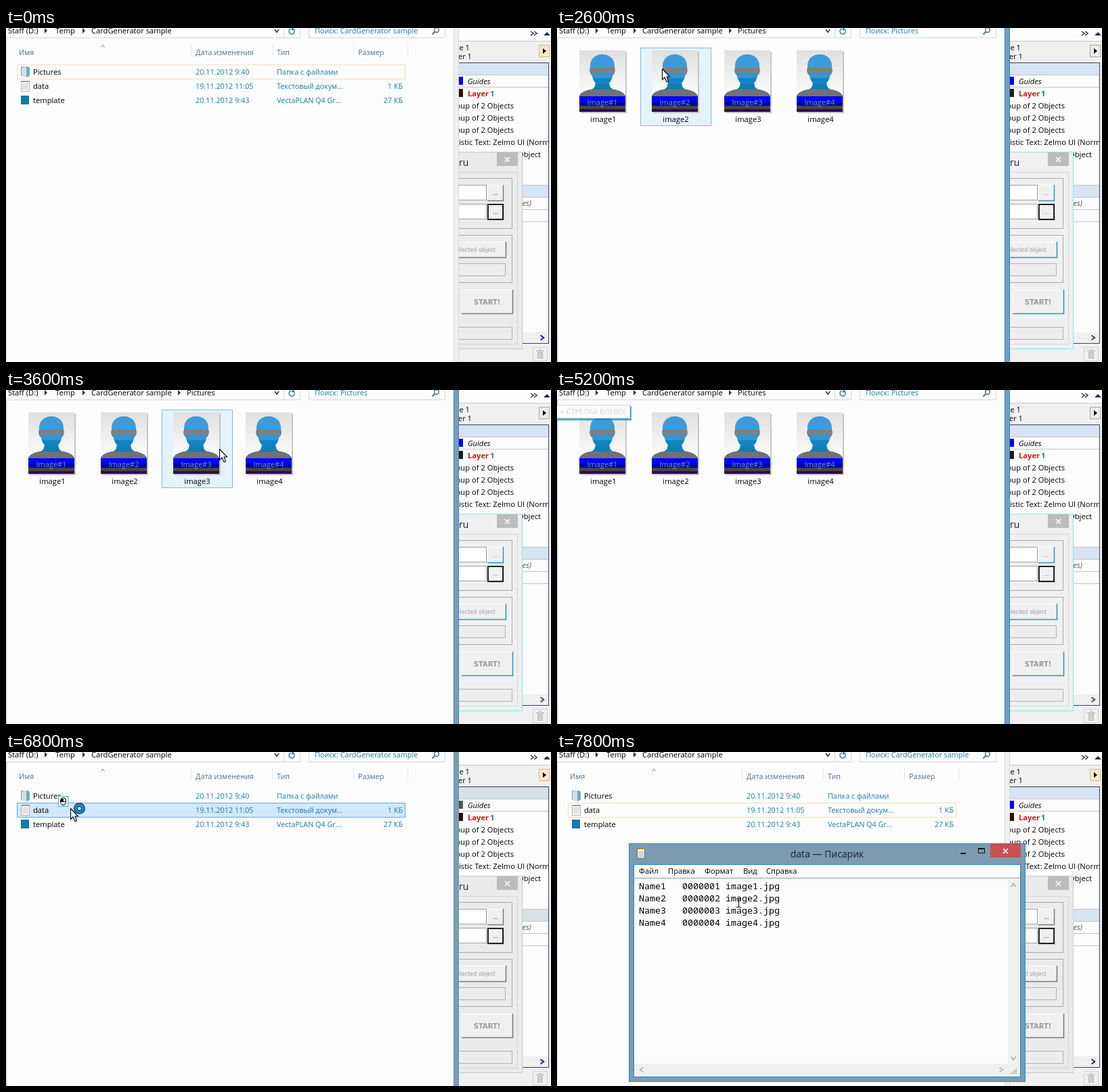
An HTML page with a canvas that plays this animation: 805 by 494 pixels, repeating every 8000 ms.

```html
<!DOCTYPE html>
<html lang="ru">
<head>
<meta charset="utf-8">
<style>
html, body { margin: 0; width: 100%; height: 100%; overflow: hidden; background: #fdfdfd; }
canvas { display: block; }
</style>
</head>
<body>
<canvas id="stage" width="805" height="494"></canvas>
<script>
const ctx = document.getElementById('stage').getContext('2d');
const LOOP = 8000, STEP = 200;
const UI = '11.2px "Open Sans", sans-serif';
const DETAIL = '10.8px "Open Sans", sans-serif';
const LINK = '#1f7aa4', BLUE = '#1f8bc6', GREY = '#c4c4c4';

// Pointer route: time, x, y
const route = [[0, 330, -40], [200, 300, -18], [800, 158, 58], [1000, 155, 60], [2800, 155, 60],
  [3400, 385, 92], [3600, 315, 87], [4000, -40, -40], [6000, -40, -40], [6600, 95, 83],
  [7200, 95, 83], [7800, 268, 223]];

const files = [
  ['Pictures', '20.11.2012 9:40', 'Папка с файлами', ''],
  ['data', '19.11.2012 11:05', 'Текстовый докум...', '1 КБ'],
  ['template', '20.11.2012 9:43', 'VectaPLAN Q4 Gr...', '27 КБ']
];

function box(x, y, w, h, fill, stroke) {
  if (fill) { ctx.fillStyle = fill; ctx.fillRect(x, y, w, h); }
  if (stroke) { ctx.strokeStyle = stroke; ctx.lineWidth = 1; ctx.strokeRect(x + .5, y + .5, w - 1, h - 1); }
}

function text(s, x, y, color = '#000', font = UI, align = 'left') {
  ctx.font = font; ctx.fillStyle = color; ctx.textAlign = align;
  ctx.fillText(s, x, y);
}

function line(color, width, ...p) {
  ctx.beginPath();
  for (let i = 0; i < p.length; i += 2) ctx.lineTo(p[i], p[i + 1]);
  ctx.strokeStyle = color; ctx.lineWidth = width; ctx.stroke();
}

function poly(fill, ...p) {
  ctx.beginPath();
  for (let i = 0; i < p.length; i += 2) ctx.lineTo(p[i], p[i + 1]);
  ctx.closePath(); ctx.fillStyle = fill; ctx.fill();
}

function ring(x, y, r, color, width, from = 0, to = 7) {
  ctx.beginPath(); ctx.arc(x, y, r, from, to);
  ctx.strokeStyle = color; ctx.lineWidth = width; ctx.stroke();
}

// Chevron pointing along (dx, dy)
function chevron(x, y, dx, dy, r = 3, color = '#555', width = 1.5) {
  line(color, width, x - (dx + dy) * r, y - (dy + dx) * r, x + dx * r * .4, y + dy * r * .4,
    x - (dx - dy) * r, y - (dy - dx) * r);
}

function cross(x, y, r) {
  line('#fff', 1.6, x - r, y - r, x + r, y + r);
  line('#fff', 1.6, x + r, y - r, x - r, y + r);
}

function bevel(x, y, w, h, edge) {
  box(x, y, w, h, '#f0f0f0', '#fff');
  line(edge, 1.5, x + w - .5, y, x + w - .5, y + h - .5, x, y + h - .5);
}

function pointerAt(t) {
  const i = Math.max(1, route.findIndex(p => p[0] >= t));
  const [a, b] = [route[i - 1], route[i]];
  const k = (t - a[0]) / (b[0] - a[0]);
  return [a[1] + (b[1] - a[1]) * k, a[2] + (b[2] - a[2]) * k];
}

function drawPanel(t, cool) {
  const strip = t >= 1000 && t < 1800 ? '#cfe6fb' : t >= 5800 && t < 7400 ? '#d9e1e7' : '#d7e4f2';
  box(661, 0, 144, 494, '#f0f0f0');
  box(661, 0, 144, 19, '#fdfdfd');
  line('#c8c8c8', 1, 661, 19.5, 805, 19.5);
  chevron(778, 8, 1, 0, 3, '#223', 1.3);
  chevron(783, 8, 1, 0, 3, '#223', 1.3);
  poly('#222a55', 794, 11, 804, 11, 799, 6);
  text('Page 1', 685, 33, '#000', UI, 'right');
  text('Layer 1', 688, 46, '#000', UI, 'right');
  box(787, 25, 16, 18, cool ? '#ececec' : '#fbe7cd', cool ? '#aaa' : '#d9b88a');
  poly('#000', 793, 30, 793, 38, 798, 34);

  box(661, 51, 141, 416, '#fdfdfd', '#3a3f66');
  box(661, 52, 140, 18, strip);
  box(661, 232, 140, 18, strip);
  for (const y of [69, 87, 232, 250, 268, 286]) line(GREY, 1, 661, y + .5, 801, y + .5);
  box(661, 72, 14, 12, t >= 6600 && t < 7400 ? '#555' : '#0000ff');
  box(661, 90, 14, 12, cool ? '#1c1c1c' : '#3a0505');
  text('Guides', 682, 83, '#000', 'italic ' + UI);
  text('Layer', 682, 101, '#d41616', 'bold ' + UI);
  text('1', 715, 101, '#1a7a9c', 'bold ' + UI);
  for (const y of [119, 137, 155]) text('Group of 2 Objects', 750, y, '#000', UI, 'right');
  ctx.save();
  ctx.beginPath(); ctx.rect(661, 52, 140, 414); ctx.clip();
  text('istic Text: Zelmo UI (Normal)', 669, 173);
  ctx.restore();
  text('of BARCODE XY Object', 790, 191, '#000', UI, 'right');
  text('Guides (all pages)', 776, 263, '#555', 'italic ' + UI, 'right');
  box(661, 450, 140, 16, '#f0f0f0');
  chevron(793, 458, 1, 0, 3.5, cool ? '#444' : '#171780', 1.7);

  box(778, 472, 22, 21, '#f0f0f0', '#d2d2d2');
  box(785, 479, 8, 10, '#dedede', '#b5b5b5');
  line('#b5b5b5', 1.3, 783, 477.5, 795, 477.5);
  line('#b5b5b5', 1, 787, 475.5, 791, 475.5);
  line('#b5b5b5', 1, 787.5, 480, 787.5, 487);
  line('#b5b5b5', 1, 790.5, 480, 790.5, 487);
}

function drawDialog(cool) {
  const edge = cool ? '#2d8fbe' : '#777';
  box(640, 183, 123, 292, cool ? '#f0f0f0' : '#ebebeb', cool ? '#8fe2f2' : '#cacaca');
  text('ru', 669, 204, '#33103f', '14px "Open Sans", sans-serif');
  box(725, 184, 31, 20, '#bcbcbc');
  cross(740.5, 194.5, 3.5);
  box(640, 213, 116, 255, cool ? '#f0f0f0' : '#ebebeb', '#d5d5d5');
  for (const [y, h] of [[222, 75], [306, 71]]) box(640, y, 108, h, null, '#a9a9a9');
  for (const y of [232, 260]) {
    box(640, y, 70, 23, '#fff', '#a0a0a0');
    bevel(711, y, 24, 24, edge);
    if (y > 240) box(711, y, 24, 24, null, '#111');
    text('...', 723, y + 15, cool ? '#b8740c' : '#222', '8px "DejaVu Sans", sans-serif', 'center');
  }
  box(712, 261, 22, 22, null, '#333');
  bevel(640, 316, 99, 24, edge);
  text('Selected object', 723, 331, '#999', '8.1px "DejaVu Sans", sans-serif', 'right');
  box(640, 348, 98, 19, '#ededed', '#b0b0b0');
  bevel(673, 387, 76, 36, edge);
  text('START!', 710.5, 409, '#999', 'bold 10px "DejaVu Sans", sans-serif', 'center');
  box(640, 442, 108, 19, '#ededed', '#b0b0b0');
}

function drawExplorer(inPictures, active) {
  const edge = inPictures ? BLUE : active ? '#5b98bb' : '#d8d8d8';
  box(0, 0, 669, 494, active ? '#7d9db4' : '#f0f0f0');
  box(0, 0, 661, 494, '#fdfdfd');
  line(edge, 1, 661.5, 0, 661.5, 494);
  line(edge, 1, 668.5, 0, 668.5, 494);
  line(active ? '#9cc4da' : '#d8d8d8', 1, .5, 15, .5, 494);
  line('#d6d6d6', 1, 0, 14.5, 434.5, 14.5, 434.5, 0);
  line('#d6d6d6', 1, 410.5, 0, 410.5, 14);
  line('#d6d6d6', 1, 447.5, 0, 447.5, 14.5, 648.5, 14.5, 648.5, 0);

  const crumbs = [['Staff (D:)', 3, 57], ['Temp', 73, 113], ['CardGenerator sample', 126, 254], ['Pictures', 267]];
  crumbs.slice(0, inPictures ? 4 : 3).forEach(([name, x, arrow], i) => {
    text(name, x, 8);
    if (i < 2 || inPictures && arrow) poly('#333', arrow, 0, arrow, 8, arrow + 4, 4);
  });
  chevron(400, 5, 0, 1, 3, '#444', 1.8);
  ring(422, 5, 4, '#44809f', 1.6, -.6, 4.4);
  poly('#44809f', 422, -1, 427, 2, 422, 4);
  text('Поиск: ' + (inPictures ? 'Pictures' : 'CardGenerator sample'), 456, 8, LINK, DETAIL);
  ring(636, 3, 3.4, '#4d6f8c', 1.5);
  line('#4d6f8c', 2, 633.5, 5.5, 629.5, 9.5);
}

function drawList(t) {
  const headers = [['Имя', 19, 273], ['Дата изменения', 280, 393], ['Тип', 400, 513], ['Размер', 520, 593]];
  for (const [name, x, sep] of headers) {
    text(name, x, 40, '#4b6f92', DETAIL);
    line('#e6e6e6', 1, sep + .5, 24, sep + .5, 41);
  }
  chevron(143, 26, 0, -1, 2.5, '#4a9ac4', 1);

  const focus = t >= 6600 ? 1 : 0;
  const y0 = 54 + focus * 21;
  if (t < 800 || t >= 7400) box(16, y0, 574, 22, null, '#f0dfbd');
  else if (t === 800) box(16, y0, 574, 22, '#e5f3fb', '#70c0e7');
  else box(16, y0, 574, 22, '#d1e7fc', '#66a7dc');

  box(22, 57, 11, 14, '#8ab4cf', '#7c9cb0');
  poly('#d3dfe7', 23, 58, 30, 57, 30, 72, 23, 72);
  poly('#6fa9cf', 30, 60, 35, 58, 35, 71, 30, 73);
  box(22, 79, 13, 15, '#fff', '#b0b0b0');
  for (let y = 82; y < 92; y += 2) line('#c4c4c4', 1, 24, y + .5, 33, y + .5);
  line('#777', 1.3, 23, 79, 35, 79);
  box(22, 100, 12, 13, '#147ba6');

  files.forEach(([name, date, type, size], i) => {
    const y = 69 + i * 21;
    text(name, 40, y);
    text(date, 280, y, LINK, DETAIL);
    text(type, 400, y, LINK, DETAIL);
    text(size, 586, y, LINK, DETAIL, 'right');
  });
}

function drawTile(i, hover) {
  const x = 33 + i * 107;
  if (hover) box(x - 17, 29, 105, 116, '#e5f3fb', '#7cc0e2');
  box(x + 2, 35, 68, 91, '#c6c6c6');
  const back = ctx.createLinearGradient(0, 33, 0, 101);
  back.addColorStop(0, '#dfdfdf'); back.addColorStop(1, '#fdfdfd');
  box(x, 33, 68, 91, back);

  ctx.save();
  ctx.translate(x, 33);
  ctx.beginPath();
  ctx.moveTo(34, 6);
  ctx.bezierCurveTo(46, 6, 53, 14, 52, 26);
  ctx.bezierCurveTo(54, 31, 51, 36, 49, 37);
  ctx.quadraticCurveTo(48, 44, 44, 48);
  ctx.quadraticCurveTo(44, 56, 50, 58);
  ctx.quadraticCurveTo(67, 61, 68, 69);
  ctx.lineTo(0, 69);
  ctx.quadraticCurveTo(1, 61, 18, 58);
  ctx.quadraticCurveTo(24, 56, 24, 48);
  ctx.quadraticCurveTo(20, 44, 19, 37);
  ctx.bezierCurveTo(17, 36, 14, 31, 16, 26);
  ctx.bezierCurveTo(15, 14, 22, 6, 34, 6);
  ctx.clip();
  const bands = [['#3d9bdb', 6], ['#7d8185', 25], ['#3b93cc', 33], ['#0d86c6', 41], ['#177bb0', 50], ['#707274', 58]];
  for (const [color, y] of bands) box(0, y, 68, 69 - y, color);
  ctx.restore();

  box(x, 101, 68, 9, '#0000fa');
  box(x, 110, 68, 5, '#0000a0');
  box(x, 115, 68, 5, '#464646');
  box(x, 120, 68, 4, '#2c0758');
  text('Image#' + (i + 1), x + 34, 114, '#6fa0a0', '11px "Open Sans", sans-serif', 'center');
  text('image' + (i + 1), x + 35.5, 139, '#000', UI, 'center');
}

function drawTooltip(alpha) {
  box(-2, 24, 112, 21, 'rgba(31,139,198,.75)');
  box(-2, 22, 110, 20, '#fdfdfd', '#d4d4d4');
  ctx.globalAlpha = alpha;
  text('(ALT + СТРЕЛКА ВЛЕВО)', 102, 36, '#555', DETAIL, 'right');
  ctx.globalAlpha = 1;
}

function drawNotepad() {
  box(106, 135, 586, 353, '#7c9bb1', BLUE);
  box(118, 143, 12, 15, '#f6f6f6', '#667');
  for (let y = 147; y < 156; y += 2) line('#a9b4bb', 1, 120, y + .5, 128, y + .5);
  line('#b98e35', 2, 119, 143, 131, 143);
  text('data — Писарик', 399, 156, '#16202c', '14px "Open Sans", sans-serif', 'center');
  line('#111', 2, 596, 150, 604, 150);
  box(622, 142, 10, 8, null, '#111');
  line('#111', 2, 622, 143, 632, 143);
  box(640, 136, 45, 20, '#c75050');
  cross(662.5, 146.5, 3.5);

  box(113, 166, 572, 315, '#fdfdfd', BLUE);
  const menu = [['Файл', 121], ['Правка', 164], ['Формат', 218], ['Вид', 275], ['Справка', 309]];
  for (const [name, x] of menu) text(name, x, 180);
  line('#8e9aa3', 1, 114, 186.5, 684, 186.5);
  for (let i = 1; i < 5; i++)
    text(`Name${i}   000000${i} image${i}.jpg`, 121, 185 + i * 18, '#000', '13.33px "Noto Sans Mono", monospace');
  box(666, 188, 18, 292, '#f0f0f0');
  box(114, 461, 570, 19, '#f0f0f0');
  chevron(674, 196, 0, -1, 3.5, '#aaa');
  chevron(674, 454, 0, 1, 3.5, '#aaa');
  chevron(124, 470, -1, 0, 3.5, '#aaa');
  chevron(657, 470, 1, 0, 3.5, '#aaa');
  for (let i = 0; i < 3; i++)
    for (let j = 0; j <= i; j++) box(677 - j * 3, 468 + i * 3, 2, 2, '#aaa');
}

function drawPointer(t, x, y) {
  if (t >= 2000 && t < 2600) return;
  ctx.save();
  ctx.translate(x, y);
  if (t >= 7800) {
    line('#111', 1, -3, -6.5, 0, -6.5);
    line('#111', 1, 1, -6.5, 4, -6.5);
    line('#111', 1, .5, -6, .5, 6);
    line('#111', 1, -3, 6.5, 4, 6.5);
  } else {
    const arrow = [.5, .5, .5, 16.5, 4, 13, 7, 19.5, 9.5, 18.5, 7, 12, 11.5, 12, .5, .5];
    poly('#fff', ...arrow);
    line('#000', 1.1, ...arrow);
  }
  if (t === 1800 || t >= 6800 && t < 7400) {
    ring(13.5, .5, 5.5, '#0e2f42', 6);
    ring(13.5, .5, 5.5, '#2089bd', 4);
  }
  if (t === 1800 || t >= 6600 && t < 7200) {
    box(-18, -18, 15, 16, '#fff', '#45a8cf');
    ctx.beginPath(); ctx.ellipse(-10.5, -10, 4, 5.5, 0, 0, 7);
    ctx.strokeStyle = '#111'; ctx.lineWidth = 1.2; ctx.stroke();
    box(-14, -14, 4, 4, '#111');
    line('#111', 1, -14.5, -9.5, -6.5, -9.5);
  }
  ctx.restore();
}

function draw(t) {
  const inPictures = t >= 2000 && t < 5600;
  const [x, y] = pointerAt(t);
  drawPanel(t, inPictures);
  drawDialog(inPictures);
  drawExplorer(inPictures, t >= 1800 && t < 7400);
  if (inPictures) {
    const hovered = y > 29 ? Math.floor((x - 16) / 107) : -1;
    for (let i = 0; i < 4; i++) drawTile(i, i === hovered);
  } else drawList(t);
  if (t === 5200 || t === 5400) drawTooltip(t === 5200 ? .25 : 1);
  if (t >= 7400) drawNotepad();
  drawPointer(t, x, y);
}

function tick() {
  draw(Math.floor(performance.now() % LOOP / STEP) * STEP);
  requestAnimationFrame(tick);
}
tick();
</script>
</body>
</html>
```
